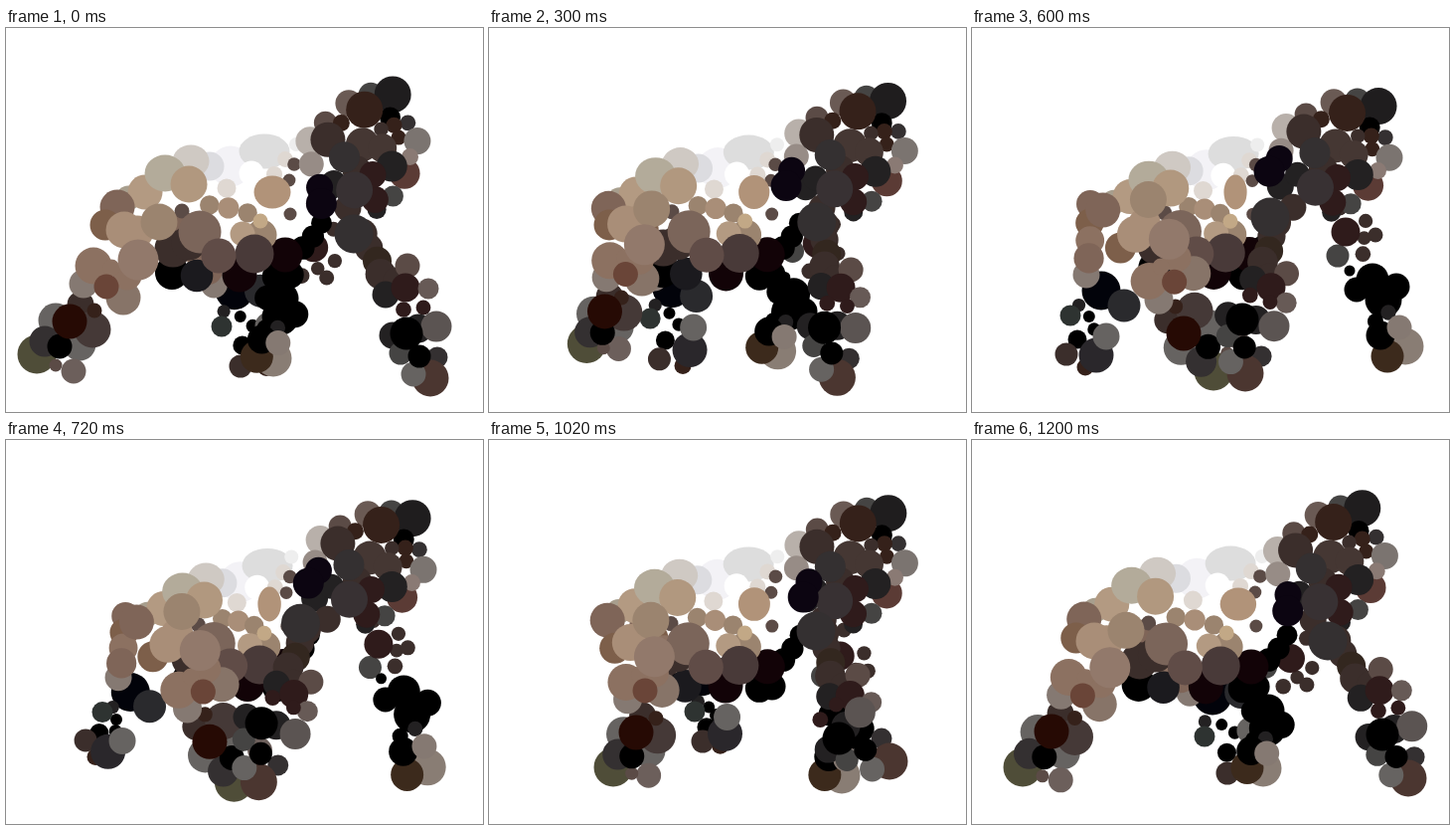
An HTML page with a canvas that plays this animation: 480x386 px, repeating every 1.26 s.

```html
<!DOCTYPE html>
<html lang="en">
<head>
<meta charset="utf-8">
<title>Walking gorilla</title>
<style>
html, body { margin: 0; width: 100%; height: 100%; overflow: hidden; background: #fff; }
canvas { display: block; }
</style>
</head>
<body>
<canvas id="stage" width="480" height="386"></canvas>
<script>
const LOOP = 1260, STEP = 60;
const POSES = [0, 180, 420, 600, 840, 1020, 1200];
const ctx = document.getElementById('stage').getContext('2d');

const black = '#000', soot = '#232122', slate = '#343031', ash = '#454443', stone = '#666361',
  umber = '#3b2e2b', bark = '#35211a', wine = '#2f1b1b', plum = '#120307', violet = '#0c0511',
  cocoa = '#5b4b46', taupe = '#857972', clay = '#8c7161', rust = '#6a4538', hide = '#7f6558',
  tan = '#a98e78', sand = '#b39a82', fawn = '#9b846f', bone = '#b3ab9a', mist = '#dfd8d2';

const angle = t => 2 * Math.PI * t / LOOP;
const sway = t => (1 - Math.cos(angle(t) - 0.09)) / 2;
const lift = t => Math.abs(Math.sin((angle(t) - 0.17) / 2));

let seed = 11;
const rand = () => (seed = seed * 16807 % 2147483647) / 2147483647;

// Evenly spaced dots from one point to another, with a little disorder.
function row(n, [x0, y0], [x1, y1], r, colours, spread = 2) {
  const off = () => (rand() - 0.5) * 2 * spread;
  return Array.from({ length: n }, (_, i) => {
    const k = n > 1 ? i / (n - 1) : 0;
    return [x0 + (x1 - x0) * k + off(), y0 + (y1 - y0) * k + off(),
      r * (0.9 + rand() * 0.2), colours[i % colours.length]];
  });
}

const wrap = i => (i + POSES.length) % POSES.length;
const span = i => (POSES[wrap(i + 1)] - POSES[wrap(i)] + LOOP) % LOOP;

// A joint that glides through one x, y pair per pose and loops smoothly.
function joint(...xy) {
  const at = (k, axis) => xy[2 * wrap(k) + axis];
  const rate = (k, axis) => (at(k + 1, axis) - at(k, axis)) / span(k);
  const slope = (k, axis) => {
    const a = span(k - 1), b = span(k);
    return (rate(k - 1, axis) * b + rate(k, axis) * a) / (a + b);
  };
  return t => {
    const i = POSES.findLastIndex(p => p <= t);
    const h = span(i), s = (t - POSES[i]) / h, r = 1 - s;
    return [0, 1].map(axis =>
      r * r * (1 + 2 * s) * at(i, axis) + s * s * (3 - 2 * s) * at(i + 1, axis)
      + h * s * r * (r * slope(i, axis) - s * slope(i + 1, axis)));
  };
}

// Dots tied to the segment between two joints, laid out as at time `rest`.
function limb(from, to, rest, dots) {
  const [px, py] = from(rest), [qx, qy] = to(rest);
  const ax = qx - px, ay = qy - py, len = ax * ax + ay * ay;
  return { dots, place(t) {
    const [fx, fy] = from(t), [gx, gy] = to(t);
    const bx = gx - fx, by = gy - fy;
    const c = (ax * bx + ay * by) / len, s = (ax * by - ay * bx) / len;
    return (x, y) => [fx + c * (x - px) - s * (y - py), fy + s * (x - px) + c * (y - py)];
  } };
}

// Dots that shift and turn around a pivot.
function pivoted([px, py], move, turn, dots) {
  return { dots, place(t) {
    const [mx, my] = move(t), a = turn * lift(t);
    const c = Math.cos(a), s = Math.sin(a);
    return (x, y) => [px + mx + c * (x - px) - s * (y - py), py + my + s * (x - px) + c * (y - py)];
  } };
}

const hip = t => [154 + 22 * sway(t), 195 - 24 * lift(t)];
const knee = joint(64,295, 59,279, 181,296, 213,307, 184,297, 148,294, 80,293);
const foot = joint(31,328, 18,303, 191,338, 243,345, 193,340, 125,329, 51,329);

const farHip = t => [178 - 59 * sway(t), 200 - 22 * lift(t)];
const farKnee = joint(217,300, 186,293, 137,292, 99,289, 119,261, 207,273, 234,298);
const farFoot = joint(236,340, 197,333, 144,333, 95,328, 97,281, 215,303, 257,335);

const shoulder = joint(350,207, 337,199, 321,192, 300,190, 302,181, 329,192, 358,202);
const elbow = joint(403,307, 364,304, 311,298, 272,293, 266,281, 352,300, 413,296);
const hand = joint(427,352, 381,352, 320,350, 275,347, 268,338, 403,323, 439,340);

const farShoulder = t => [322 + 28 * lift(t), 180 - 5 * lift(t)];
const farElbow = joint(278,272, 268,272, 356,262, 403,253, 384,258, 360,275, 298,272);
const farHand = joint(269,332, 235,327, 366,323, 436,320, 392,338, 355,337, 293,330);

const farThigh = limb(farHip, farKnee, 600, [
  [130, 264, 19, '#02030a'], [153, 279, 16, '#2a2a2d'], [115, 248, 13, taupe],
  ...row(4, [120, 177], [118, 232], 14, [hide, '#7d5f4a', clay], 1)
]);

const farCalf = limb(farKnee, farFoot, 600, [
  ...row(3, [109, 279], [124, 302], 6, [soot, black, black]),
  [99, 289, 10, '#2e3331'], [106, 313, 9, black], [114, 341, 8, bark],
  [95, 328, 11, umber], [125, 329, 17, '#2a272b'], [135, 310, 13, stone]
]);

const farUpperArm = limb(farShoulder, farElbow, 600, [
  [370, 181, 7, umber], ...row(3, [396, 194], [394, 227], 7, [umber], 1), [406, 208, 7, umber],
  [368, 229, 11, ash], [376, 205, 14, wine]
]);

const farForearm = limb(farElbow, farHand, 600, [
  [380, 244, 5, black], [387, 263, 12, black], [403, 253, 16, black], [427, 260, 13, black],
  [414, 273, 18, black], ...row(2, [406, 295], [419, 286], 7, [black, soot], 0),
  [436, 320, 18, '#897d74'], [418, 330, 16, '#3c2a1c'], [411, 309, 14, black], [430, 301, 12, taupe]
]);

// The trunk bends: the rump slides most, the chest hardly at all.
const trunk = {
  place(t) {
    const s = sway(t);
    return (x, y) => [
      x + s * (20 - (x - 112) ** 2 / 1300),
      y + s * (200 - y) * (1 - x / 300) / 4];
  },
  dots: [
    [226, 139, 20, '#f3f2f6'], [205, 139, 14, '#dcdce0'], [260, 124, 25, '#ddd', 17],
    [247, 146, 12, '#fff'], ...row(3, [270, 147], [292, 117], 7, [mist, mist, '#eee'], 0),
    [222, 161, 9, mist], ...row(2, [290, 137], [285, 153], 6, [cocoa], 0),
    ...row(3, [318, 196], [298, 222], 11, [black], 1),
    [325, 160, 13, soot], [344, 181, 13, umber],
    ...row(2, [167, 246], [192, 249], 16, [black, '#1b1a1e'], 0),
    ...row(2, [272, 250], [286, 248], 14, [black], 0),
    ...row(2, [168, 222], [184, 216], 17, [umber], 0),
    [235, 248, 17, plum], [281, 228, 17, plum],
    [186, 134, 18, '#cfc9c3', 16], [123, 171, 12, '#a89f8e'], [140, 165, 17, sand],
    [160, 146, 20, bone, 18], [112, 180, 17, hide], [177, 184, 7, cocoa],
    ...row(3, [205, 178], [243, 185], 10, [fawn, tan], 1), [286, 187, 6, cocoa],
    [257, 208, 15, fawn], [238, 207, 12, sand], [256, 194, 7, '#c2a886'],
    [250, 227, 19, '#493a39'], [195, 205, 21, '#7b655a'], [214, 229, 17, '#604c47'],
    [184, 157, 18, '#b1987f']
  ]
};

const calf = limb(knee, foot, 0, [
  [50, 294, 17, stone], [74, 318, 16, stone], [31, 328, 19, '#4f4d38'], [39, 315, 15, slate],
  [75, 278, 13, umber], [87, 303, 18, '#453937'], [68, 345, 12, '#6c5f5b'],
  [50, 339, 6, cocoa], [89, 284, 7, bark], [54, 320, 12, black], [64, 295, 17, '#260a04']
]);

const thigh = limb(hip, knee, 0, [
  [100, 198, 15, '#7d5f4a'], [132, 205, 16, tan], [119, 203, 18, tan], [154, 195, 18, fawn],
  [78, 257, 14, taupe], [118, 271, 17, '#877468'], [122, 249, 14, clay], [88, 239, 18, clay],
  [106, 241, 8, clay], [133, 233, 20, '#92796b'], [101, 260, 12, rust]
]);

const head = pivoted([323, 113], t => [11 * lift(t), -9 * lift(t)], 0.31, [
  [305, 115, 14, '#b8b0aa'], [320, 96, 11, cocoa], [307, 138, 12, '#978c86'],
  [343, 76, 13, '#6a5a54'], [365, 67, 12, ash], [387, 66, 18, '#1f1d1e'], [385, 89, 10, black],
  [359, 82, 18, bark], [336, 96, 8, bark], ...row(3, [402, 93], [376, 101], 7, [slate, bark, umber], 1),
  [394, 109, 7, bark], [413, 112, 13, '#7b7470'], [401, 145, 15, '#5b3b35'], [406, 128, 8, '#8a7a74'],
  [390, 168, 10, ash], [374, 182, 9, soot], [372, 172, 13, wine],
  ...row(2, [358, 117], [378, 120], 15, ['#453733'], 0), [388, 138, 15, soot],
  [323, 113, 17, umber], [353, 143, 14, umber], [369, 147, 13, wine],
  [330, 156, 12, soot], [340, 130, 15, slate], [351, 163, 18, '#383133']
]);

const upperArm = limb(shoulder, elbow, 0, [
  ...row(4, [360, 205], [378, 249], 14, [umber, umber, '#33271f']), [392, 253, 12, umber],
  [382, 268, 13, soot], [404, 239, 12, cocoa], [402, 261, 14, wine], [425, 262, 10, '#675a56'],
  [350, 207, 19, slate]
]);

const forearm = limb(elbow, hand, 0, [
  ...row(2, [400, 283], [420, 281], 7, [wine], 0), [389, 309, 13, soot], [415, 302, 14, soot],
  [433, 300, 15, '#5b5452'], [397, 327, 11, ash], [434, 331, 10, slate], [427, 352, 18, '#4b3630'],
  [410, 348, 12, stone], [416, 330, 11, black], [403, 307, 16, black]
]);

const chest = pivoted([308, 163], t => [5 + 9 * Math.cos(angle(t) - 5), -32 * lift(t)], 0.87,
  [[308, 163, 13, violet], [311, 179, 15, violet]]);

const parts = [farThigh, farCalf, farUpperArm, farForearm, trunk, calf, thigh,
  head, upperArm, forearm, chest];

function oval(x, y, rx, ry, colour) {
  ctx.fillStyle = colour;
  ctx.beginPath();
  ctx.ellipse(x, y, rx + 0.5, ry + 0.5, 0, 0, 2 * Math.PI);
  ctx.fill();
}

function draw(t) {
  ctx.fillStyle = '#fff';
  ctx.fillRect(0, 0, 480, 386);
  for (const part of parts) {
    const put = part.place(t);
    for (const [x, y, rx, colour, ry = rx] of part.dots) oval(...put(x, y), rx, ry, colour);
    // The flank patch narrows as the trunk sways.
    if (part === trunk) oval(268 - 3 * sway(t), 165, 18 - 7 * sway(t), 16 + sway(t), '#b19379');
  }
}

let shown = -1;
function tick() {
  const t = Math.floor(performance.now() % LOOP / STEP) * STEP;
  if (t !== shown) draw(shown = t);
  requestAnimationFrame(tick);
}
tick();
</script>
</body>
</html>
```
